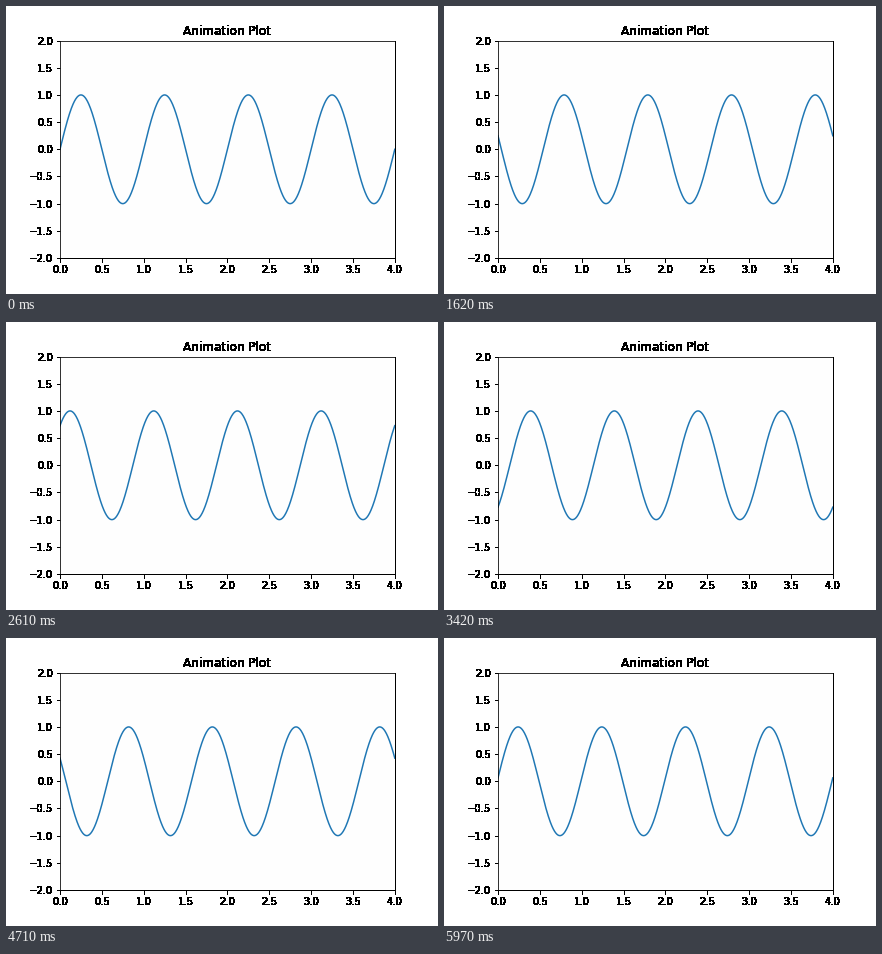
Recreate the animation shown at these times as a matplotlib script. Size 432 by 288 pixels, loop 6000 ms.

```python
import numpy as np
import matplotlib.pyplot as plt
from matplotlib.animation import FuncAnimation

FRAMES = 200
INTERVAL = 30
SPEED = 0.01  # x units travelled per frame

plt.rcParams["font.family"] = "DejaVu Sans"


def harden(img, dpi):
    """Make every touched pixel opaque, so ink outside the plot has hard edges."""
    out = img.copy()
    out[..., 3] = img[..., 3] > 0
    return out, 0, 0


fig = plt.figure(figsize=(6, 4), dpi=72, facecolor="white")
fig.subplots_adjust(left=0.125, right=0.9, bottom=0.125, top=0.88)
ax = fig.add_subplot(facecolor="#fefefe", xlim=(0, 4), ylim=(-2, 2))
ax.set_title("Animation Plot", fontsize=12)
ax.tick_params(labelsize=10)
ax.set_agg_filter(harden)

x = np.linspace(0, 4, 1000)
line, = ax.plot([], [], color="#1f77b4", lw=1.5)


def update(i):
    line.set_data(x, np.sin(2 * np.pi * (x - SPEED * i)))
    return line,


anim = FuncAnimation(fig, update, frames=FRAMES, interval=INTERVAL,
                     init_func=lambda: update(0), repeat=True, repeat_delay=0)
plt.show()
```
